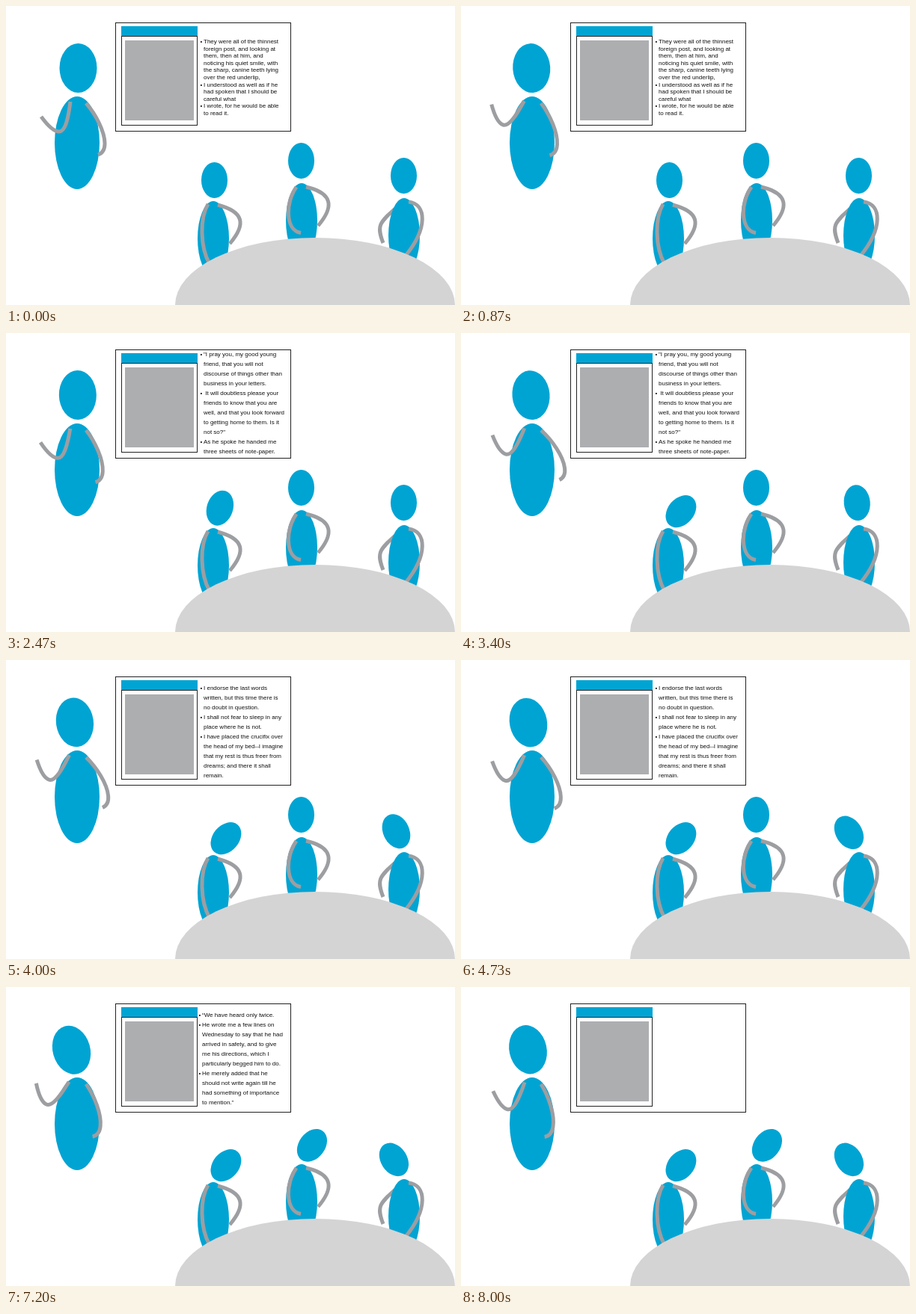
These frames come from a looping animation (600x400 px, 8.07 s). An HTML page:

```html
<!DOCTYPE html>
<html lang="en">
<head>
<meta charset="utf-8">
<title>Presentation</title>
<style>
html, body { margin: 0; width: 100%; height: 100%; overflow: hidden; background: #fff; }
svg { display: block; width: 600px; height: 400px; }
.blue { fill: #00a4d3; }
.arm { fill: none; stroke: #9d9ea1; stroke-width: 5; }
.frame { fill: #fff; stroke: #222; stroke-width: 1; }
text { font: 8px "Liberation Sans", Arial, sans-serif; fill: #111; white-space: pre; }
</style>
</head>
<body>
<svg viewBox="0 0 600 400">
  <rect class="frame" x="146.5" y="22.5" width="234" height="145"/>
  <rect class="blue" x="154" y="27" width="102" height="13"/>
  <rect class="frame" x="154.5" y="40.5" width="101" height="119"/>
  <rect x="159" y="46" width="92" height="107" fill="#adaeb0"/>
  <g id="slide"></g>

  <ellipse class="blue" cx="95" cy="183" rx="30" ry="62"/>
  <ellipse class="blue" id="speaker" cx="96.5" cy="83" rx="25" ry="33"/>
  <path class="arm" id="armL" d="M86 128C83 152 79 168 71 168C63 168 55 159 47 148"/>
  <path class="arm" id="armR" d="M107 130C120 145 132 168 132 184C132 192 129 197 123 199"/>

  <ellipse class="blue" cx="277" cy="311" rx="21" ry="50"/>
  <path class="arm" d="M270 265C259 283 259 322 272 345M283 266C317 275 322 291 299 318"/>
  <ellipse class="blue" id="left" cx="278.5" cy="233" rx="17.5" ry="24"/>

  <ellipse class="blue" cx="395" cy="287" rx="21" ry="50"/>
  <path class="arm" d="M388 242C373 263 373 300 394 303.500M401 242C435 250 440 267 417 294"/>
  <ellipse class="blue" id="middle" cx="394.5" cy="207" rx="17.5" ry="24"/>

  <path class="arm" d="M520 271C499 290 495 294 504 317"/>
  <ellipse class="blue" cx="532" cy="307" rx="21" ry="50"/>
  <path class="arm" d="M538 262C562 265 564 297 534 334"/>
  <ellipse class="blue" id="right" cx="531.5" cy="227" rx="17.5" ry="24"/>

  <ellipse cx="413" cy="400" rx="187" ry="90" fill="#d4d4d4"/>
</svg>
<script>
const LOOP = 8070, FPS = 15;
const $ = id => document.getElementById(id);

// Lines starting with * carry a bullet.
const pages = [
  { x: 264, y: 50, step: 9.6, lines: [
    "*They were all of the thinnest", "foreign post, and looking at", "them, then at him, and",
    "noticing his quiet smile, with", "the sharp, canine teeth lying", "over the red underlip,",
    "*I understood as well as if he", "had spoken that I should be", "careful what",
    "*I wrote, for he would be able", "to read it."] },
  { x: 264, y: 31, step: 13, lines: [
    "*\"I pray you, my good young", "friend, that you will not", "discourse of things other than",
    "business in your letters.", "*\u00a0It will doubtless please your", "friends to know that you are",
    "well, and that you look forward", "to getting home to them. Is it", "not so?\"",
    "*As he spoke he handed me", "three sheets of note-paper."] },
  { x: 264, y: 40, step: 13, lines: [
    "*I endorse the last words", "written, but this time there is", "no doubt in question.",
    "*I shall not fear to sleep in any", "place where he is not.",
    "*I have placed the crucifix over", "the head of my bed--I imagine", "that my rest is thus freer from",
    "dreams; and there it shall", "remain."] },
  { x: 262, y: 40, step: 13, lines: [
    "*\u201cWe have heard only twice.", "*He wrote me a few lines on", "Wednesday to say that he had",
    "arrived in safety, and to give", "me his directions, which I", "particularly begged him to do.",
    "*He merely added that he", "should not write again till he", "had something of importance",
    "to mention.\u201d"] }
];

function addText(parent, x, y, str) {
  const el = document.createElementNS("http://www.w3.org/2000/svg", "text");
  el.setAttribute("x", x);
  el.setAttribute("y", y);
  el.textContent = str;
  parent.append(el);
}

const groups = pages.map(({ x, y, step, lines }) => {
  const g = document.createElementNS("http://www.w3.org/2000/svg", "g");
  lines.forEach((line, i) => {
    const top = y + i * step;
    if (line[0] === "*") addText(g, x - 4.6, top, "\u2022");
    addText(g, x, top, line.replace("*", ""));
  });
  $("slide").append(g);
  return g;
});

const linear = u => u;
const sine = u => (1 - Math.cos(Math.PI * u)) / 2;

// Each part turns about its pivot; keys are [seconds, degrees].
const parts = [
  { id: "speaker", pivot: [96.5, 116], ease: linear, keys: [[0, 0], [0.85, -4], [1.65, 0], [2.2, 0],
    [3.4, -5.2], [4.7, -11.2], [5.85, -17.8], [7.2, -15.8], [8.1, -11.8]] },
  { id: "armL", pivot: [88, 123], ease: sine, keys: [[0, 0], [1, 22], [2, 0], [4, 18.7],
    [4.6, 15.7], [5.4, 25.5], [6, 1.5], [7, 25], [9, -2]] },
  { id: "armR", pivot: [108, 130], ease: sine, keys: [[0, 0], [2, 9.3], [3.1, -7.5],
    [5.4, 0], [6, 0], [8, 9.3]] },
  { id: "left", pivot: [278.5, 257], ease: sine, keys: [[2, 0], [3, 40]] },
  { id: "right", pivot: [531.5, 251], ease: sine, keys: [[3, 0], [4.5, -33]] },
  { id: "middle", pivot: [394.5, 231], ease: sine, keys: [[5, 0], [6, 37]] }
];

function angleAt(keys, ease, t) {
  if (t <= keys[0][0]) return keys[0][1];
  const i = keys.findIndex(k => k[0] > t);
  if (i < 0) return keys[keys.length - 1][1];
  const [t0, a] = keys[i - 1], [t1, b] = keys[i];
  return a + (b - a) * ease((t - t0) / (t1 - t0));
}

function draw(ms) {
  const t = Math.floor((ms % LOOP + 4) * FPS / 1000) / FPS;
  const page = Math.floor(t / 2 + 1e-6);
  groups.forEach((g, i) => g.setAttribute("visibility", i === page ? "visible" : "hidden"));
  for (const { id, pivot, ease, keys } of parts)
    $(id).setAttribute("transform", `rotate(${angleAt(keys, ease, t)} ${pivot})`);
}

const start = performance.now();
function tick() {
  draw(performance.now() - start);
  requestAnimationFrame(tick);
}
tick();
</script>
</body>
</html>
```
